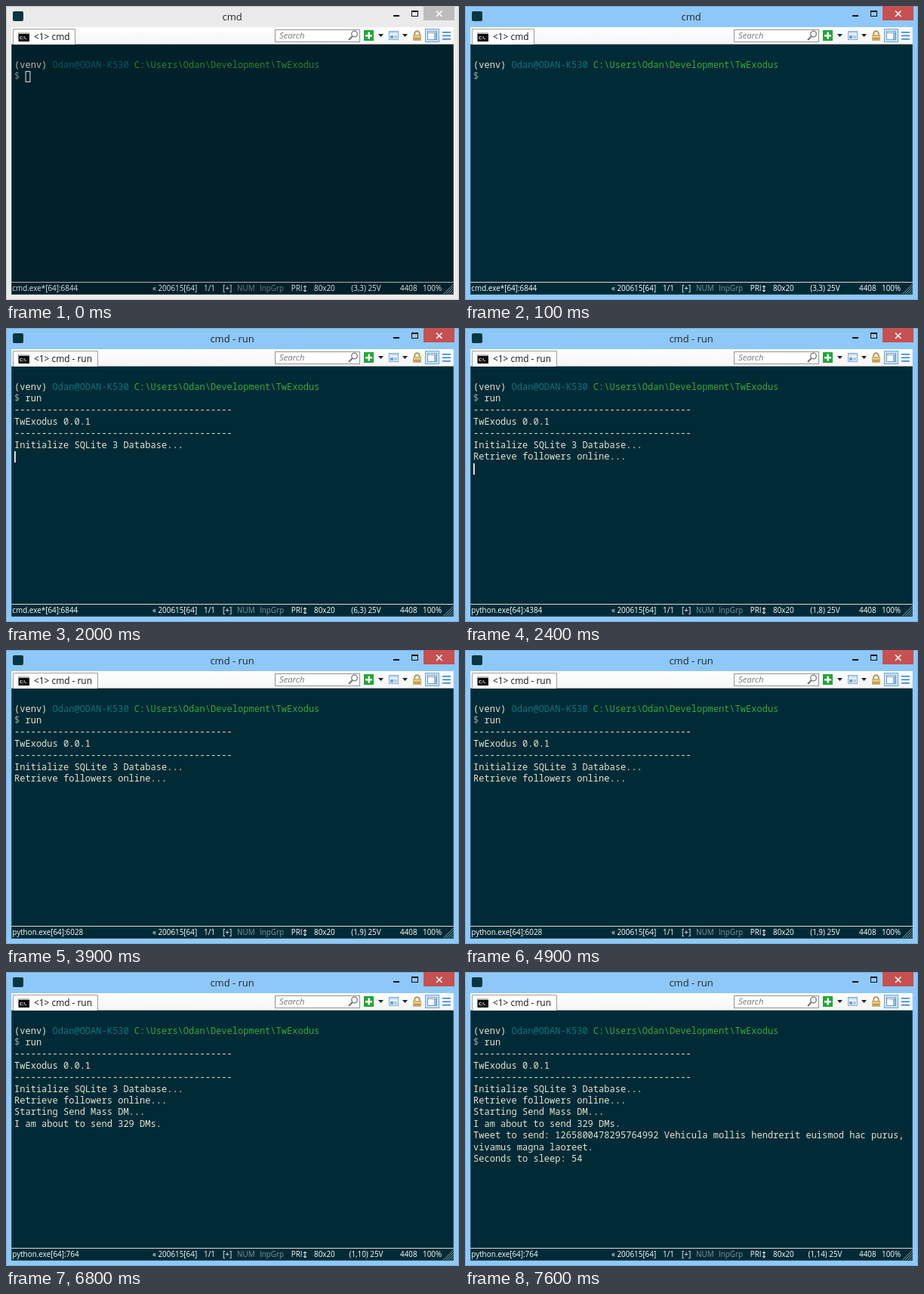
Write an HTML page with a canvas that moves like this. It is 600 px wide and 389 px high and loops after 8 s.

```html
<!DOCTYPE html>
<html lang="en">
<head>
<meta charset="utf-8">
<title>Console</title>
<style>
  html, body { margin: 0; width: 100%; height: 100%; overflow: hidden; }
  canvas { display: block; width: 600px; height: 389px; }
</style>
</head>
<body>
<canvas id="stage" width="600" height="389"></canvas>
<script>
const ctx = document.getElementById('stage').getContext('2d');
const LOOP = 8000;
const UI = '"Open Sans", "Noto Sans", "DejaVu Sans", sans-serif';
const MONO = '"Noto Sans Mono", "DejaVu Sans Mono", monospace';
const CELL_W = 7.22, ROW_H = 15.4, LEFT = 11, TOP = 66.2;
const EDGE = 7.25, INNER_W = 600 - 2 * EDGE;
const RULE = '-'.repeat(40);

// Output lines: time shown, row, text
const output = [
  [2000, 3, RULE],
  [2000, 4, 'TwExodus 0.0.1'],
  [2000, 5, RULE],
  [2000, 6, 'Initialize SQLite 3 Database...'],
  [2400, 7, 'Retrieve followers online...'],
  [6300, 8, 'Starting Send Mass DM...'],
  [6600, 9, 'I am about to send 329 DMs.'],
  [7000, 10, 'Tweet to send: 1265800478295764992 Vehicula mollis hendrerit euismod hac purus,'],
  [7000, 11, 'vivamus magna laoreet.'],
  [7000, 12, 'Seconds to sleep: 54']
];

const typed = [[0, ''], [800, 'r'], [1200, 'run']];
const process = [[0, 'cmd.exe*[64]:6844'], [2200, 'python.exe[64]:4384'],
  [3300, 'python.exe[64]:6028'], [6600, 'python.exe[64]:764']];
const position = [[0, '3,3'], [800, '4,3'], [1600, '6,3'], [2200, '1,8'],
  [2700, '1,9'], [6600, '1,10'], [7600, '1,14']];
// Cursor cell as [column, row], or null while blinked off
const cursor = [[0, null], [600, [2, 2]], [800, [3, 2]], [1200, [5, 2]], [1800, null],
  [2000, [0, 7]], [2400, [0, 8]], [2800, null], [3300, [0, 8]], [3900, null],
  [4400, [0, 8]], [4900, null], [5400, [0, 8]], [6000, null], [6300, [0, 9]],
  [6600, [0, 10]], [6800, null], [7000, [0, 13]], [7600, null]];

const at = (steps, t) => steps.filter(s => s[0] <= t).pop()[1];

function rect(x, y, w, h, color) {
  ctx.fillStyle = color;
  ctx.fillRect(x, y, w, h);
}

function box(x, y, w, h, color, width = 1) {
  ctx.strokeStyle = color;
  ctx.lineWidth = width;
  ctx.strokeRect(x + width / 2, y + width / 2, w - width, h - width);
}

function line(color, width, ...pts) {
  ctx.strokeStyle = color;
  ctx.lineWidth = width;
  ctx.beginPath();
  for (let i = 0; i < pts.length; i += 2) ctx.lineTo(pts[i], pts[i + 1]);
  ctx.stroke();
}

function label(text, x, y, size, color, align = 'left', style = '') {
  ctx.font = `${style} ${size}px ${UI}`;
  ctx.textAlign = align;
  ctx.fillStyle = color;
  ctx.fillText(text, x, y);
}

function cells(text, col, row, color) {
  ctx.font = `12px ${MONO}`;
  ctx.textAlign = 'left';
  ctx.fillStyle = color;
  [...text].forEach((ch, i) =>
    ctx.fillText(ch, LEFT + (col + i) * CELL_W, TOP + row * ROW_H));
}

function dropArrow(x) {
  ctx.fillStyle = '#222';
  ctx.beginPath();
  ctx.moveTo(x, 37);
  ctx.lineTo(x + 7, 37);
  ctx.lineTo(x + 3.5, 41);
  ctx.fill();
}

function drawFrame(active, title) {
  rect(0, 0, 600, 389, active ? '#8ec8f8' : '#ebebeb');
  box(0, 0, 600, 389, active ? '#79afd9' : '#c9c9c9');

  ctx.fillStyle = '#063642';
  ctx.beginPath();
  ctx.roundRect(9, 7, 14, 13, 2);
  ctx.fill();
  label(title, 299.6, 18.5, 13, '#222', 'center');

  rect(513, 12, 8, 2, '#111');
  box(537, 6, 9, 8, '#111');
  rect(537, 6, 9, 2, '#111');
  rect(553, 0, 41, 19, active ? '#c75050' : '#bcbcbc');
  line('#fff', 1.6, 570, 6.5, 577.5, 14);
  line('#fff', 1.6, 577.5, 6.5, 570, 14);
}

function drawToolbar(title) {
  const shade = ctx.createLinearGradient(0, 28, 0, 51);
  shade.addColorStop(0, '#fff');
  shade.addColorStop(1, '#f4f5f6');
  rect(EDGE, 28, INNER_W, 23, shade);
  line('#a8abae', 1, EDGE, 50.5, EDGE + INNER_W, 50.5);

  const tabWidth = title === 'cmd' ? 83 : 113;
  rect(9, 30, tabWidth, 21, '#fff');
  line('#9a9da0', 1, 9.5, 51, 9.5, 30.5, 8.5 + tabWidth, 30.5, 8.5 + tabWidth, 51);
  rect(16.5, 35, 14.5, 12, '#0a0a0a');
  rect(16.5, 35, 14.5, 2, '#b4b8bc');
  label('C:\\.', 18, 44, 6, '#fff', 'left', 'bold');
  label('<1> ' + title, 37, 45.3, 11.9, '#111');

  rect(356, 31, 113, 17, '#fff');
  box(356, 31, 113, 17, '#8f9499');
  label('Search', 362, 43, 11.3, '#777', 'left', 'italic');
  ctx.strokeStyle = '#777';
  ctx.lineWidth = 1.3;
  ctx.beginPath();
  ctx.arc(461.5, 37, 3.8, 0, Math.PI * 2);
  ctx.stroke();
  line('#777', 2, 458.7, 40, 454, 45);

  rect(474, 32, 13, 14, '#21a637');
  rect(479.5, 34.5, 2.5, 9, '#fff');
  rect(476, 38, 9, 2.5, '#fff');
  dropArrow(493);

  rect(507, 33, 13, 12, '#e6f1fb');
  box(507, 33, 13, 12, '#7fabd8');
  rect(508, 34, 11, 2, '#bcd9f3');
  rect(509, 39, 4, 4, '#6c9fd4');
  rect(514, 39, 4, 4, '#a8cdf0');
  dropArrow(525);

  ctx.strokeStyle = '#b3965a';
  ctx.lineWidth = 2;
  ctx.beginPath();
  ctx.arc(544.5, 36.5, 3.3, Math.PI, 0);
  ctx.lineTo(547.8, 40);
  ctx.moveTo(541.2, 36.5);
  ctx.lineTo(541.2, 40);
  ctx.stroke();
  rect(539, 38, 11, 8, '#d3b269');
  rect(540, 40, 9, 1, '#f1d993');
  rect(540, 43, 9, 1, '#a98a48');

  rect(555, 30, 19, 18, '#cbe5fb');
  box(555, 30, 19, 18, '#65a5de');
  rect(558, 33, 13, 12, '#f8fcff');
  box(558, 33, 13, 12, '#7d9dbd');
  rect(567, 36, 3, 8, '#89b9e6');
  line('#7d9dbd', 1, 559, 35.5, 570, 35.5);

  for (let y = 34; y < 44; y += 4.5) rect(578, y, 11, 1.6, '#3584d6');
}

function drawConsole(t, active) {
  rect(EDGE, 51, INNER_W, 330.75, active ? '#002b36' : '#00212a');
  const ink = active ? '#e6e2d2' : '#b9b8ad';
  cells('(venv)', 0, 1, ink);
  cells('Odan@ODAN-K530', 7, 1, active ? '#12717d' : '#0b5661');
  cells('C:\\Users\\Odan\\Development\\TwExodus', 22, 1, active ? '#3da638' : '#2c822c');
  cells('$', 0, 2, active ? '#93a1a1' : '#748384');
  cells(at(typed, t), 2, 2, ink);
  for (const [start, row, text] of output) {
    if (t >= start) cells(text, 0, row, ink);
  }

  if (!active) {
    box(25.5, 86, 7, 15, '#c3c5c1', 1.2);
    return;
  }
  const cell = at(cursor, t);
  if (cell) rect(LEFT + cell[0] * CELL_W, Math.round(55.3 + cell[1] * ROW_H), 1.8, 15, '#f4f3ea');
}

function drawStatus(t, active) {
  const ink = active ? '#fff' : '#dfe3e1';
  const dim = active ? '#82949a' : '#6d7e83';
  line(active ? '#d3dadb' : '#a9b4b6', 1, EDGE, 365.5, EDGE + INNER_W, 365.5);
  const items = [
    [at(process, t), 8.3, ink], ['« 200615[64]', 194, ink], ['1/1', 262, ink],
    ['[+]', 287, ink], ['NUM', 306, dim], ['InpGrp', 336, dim],
    ['PRI', 377.7, ink], ['80x20', 408, ink], ['4408', 522, ink], ['100%', 552, ink]
  ];
  for (const [text, x, color] of items) label(text, x, 377.3, 9.9, color);
  label(`(${at(position, t)}) 25V`, 477, 377.3, 9.9, ink, 'center');

  // Narrow up-down arrow after PRI
  line(ink, 1, 396, 370, 396, 378);
  line(ink, 1, 394, 372, 396, 370, 398, 372);
  line(ink, 1, 394, 376, 396, 378, 398, 376);

  for (let d = 3; d <= 13; d += 3.3) line('#97a8ab', 1, 592.5 - d, 381, 592.5, 381 - d);
}

function draw(t) {
  const active = t >= 100;
  const title = t >= 2000 ? 'cmd - run' : 'cmd';
  drawFrame(active, title);
  drawToolbar(title);
  drawConsole(t, active);
  drawStatus(t, active);
}

const begin = performance.now();
function tick() {
  draw((performance.now() - begin) % LOOP);
  requestAnimationFrame(tick);
}
tick();
</script>
</body>
</html>
```
